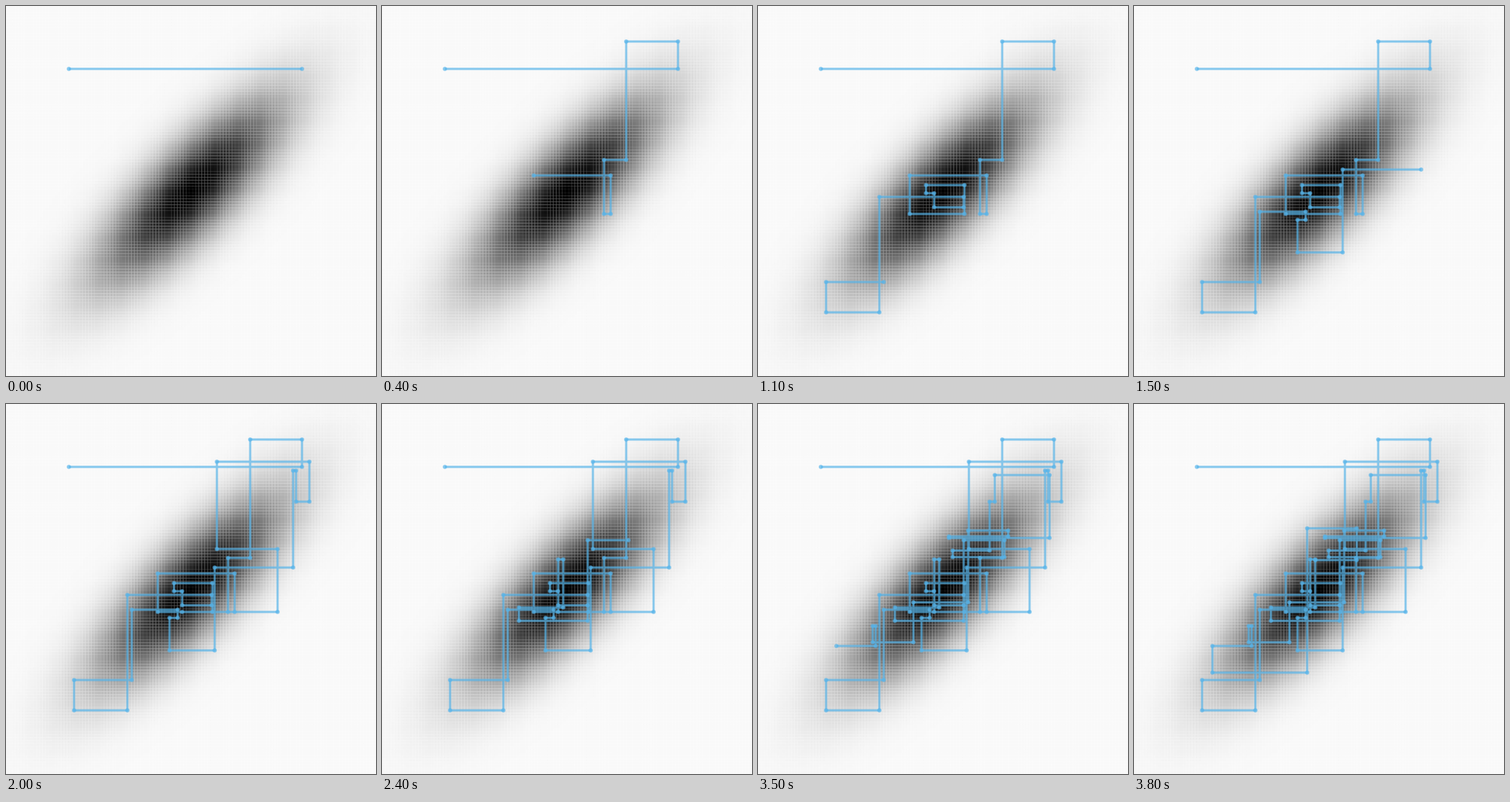
Write an HTML page with a canvas that moves like this. It is 500x500 px and loops after 3900 ms.

```html
<!DOCTYPE html>
<html lang="en">
<head>
<meta charset="utf-8">
<title>Gibbs sampling</title>
<style>
  html, body { margin: 0; width: 100%; height: 100%; overflow: hidden; background: #fff; }
  canvas, svg { position: absolute; left: 0; top: 0; width: 500px; height: 500px; display: block; }
</style>
</head>
<body>
<canvas id="density" width="500" height="500"></canvas>
<svg viewBox="0 0 500 500">
  <path id="walk" fill="none" stroke="#56b4e9" stroke-width="2.85" stroke-linejoin="round" stroke-opacity=".7"/>
  <g id="dots" fill="#56b4e9" fill-opacity=".7"></g>
</svg>
<script>
const SIZE = 500, STEP = 100;

// Sampled coordinates: x, y, x, y, ... Each one replaces the last of its axis.
const samples = [
  85, 85, 400, 48, 330, 208, 300, 281, 309, 229, 205, 281, 279, 242, 227, 253, 238, 272, 278, 258,
  164, 414, 92, 373, 170, 278, 232, 289, 221, 333, 282, 221, 388, 90, 392, 132, 410, 78, 285, 196,
  367, 281, 238, 210, 245, 275, 185, 293, 278, 184, 333, 207, 263, 198, 313, 132, 320, 96, 394, 181,
  258, 179, 338, 171, 284, 268, 210, 322, 155, 300, 159, 327, 106, 363, 234, 168, 301, 211, 245];
const points = samples.slice(1).map((value, i) =>
  i % 2 ? [value, samples[i]] : [samples[i], value]);
const steps = points.length / 2;

// Correlated normal density over -3..3; fractional tile edges leave faint seams.
function drawDensity(tiles = 121, rho = 0.8) {
  const ctx = document.getElementById('density').getContext('2d');
  const side = SIZE / tiles;
  const toUnit = i => 6 * ((i + 0.5) / tiles - 0.5);
  for (let row = 0; row < tiles; row++) {
    for (let col = 0; col < tiles; col++) {
      const x = toUnit(col), y = -toUnit(row);
      const q = (x * x - 2 * rho * x * y + y * y) / (1 - rho * rho);
      const g = Math.round(249 * (1 - Math.exp(-q / 2)));
      ctx.fillStyle = `rgb(${g},${g},${g})`;
      ctx.fillRect(col * side, row * side, side, side);
    }
  }
}

const walk = document.getElementById('walk');
const dots = points.map(([x, y]) => {
  const dot = document.createElementNS('http://www.w3.org/2000/svg', 'circle');
  dot.setAttribute('cx', x);
  dot.setAttribute('cy', y);
  dot.setAttribute('r', 2.8);
  document.getElementById('dots').append(dot);
  return dot;
});

let shown = -1;
function render(ms) {
  const step = Math.floor(ms / STEP) % steps;
  if (step === shown) return;
  shown = step;
  const count = 2 * step + 2;
  walk.setAttribute('d', 'M' + points.slice(0, count).join('L'));
  dots.forEach((dot, i) => dot.setAttribute('visibility', i < count ? 'visible' : 'hidden'));
}

drawDensity();
const begin = performance.now();
function tick() {
  render(performance.now() - begin);
  requestAnimationFrame(tick);
}
tick();
</script>
</body>
</html>
```
